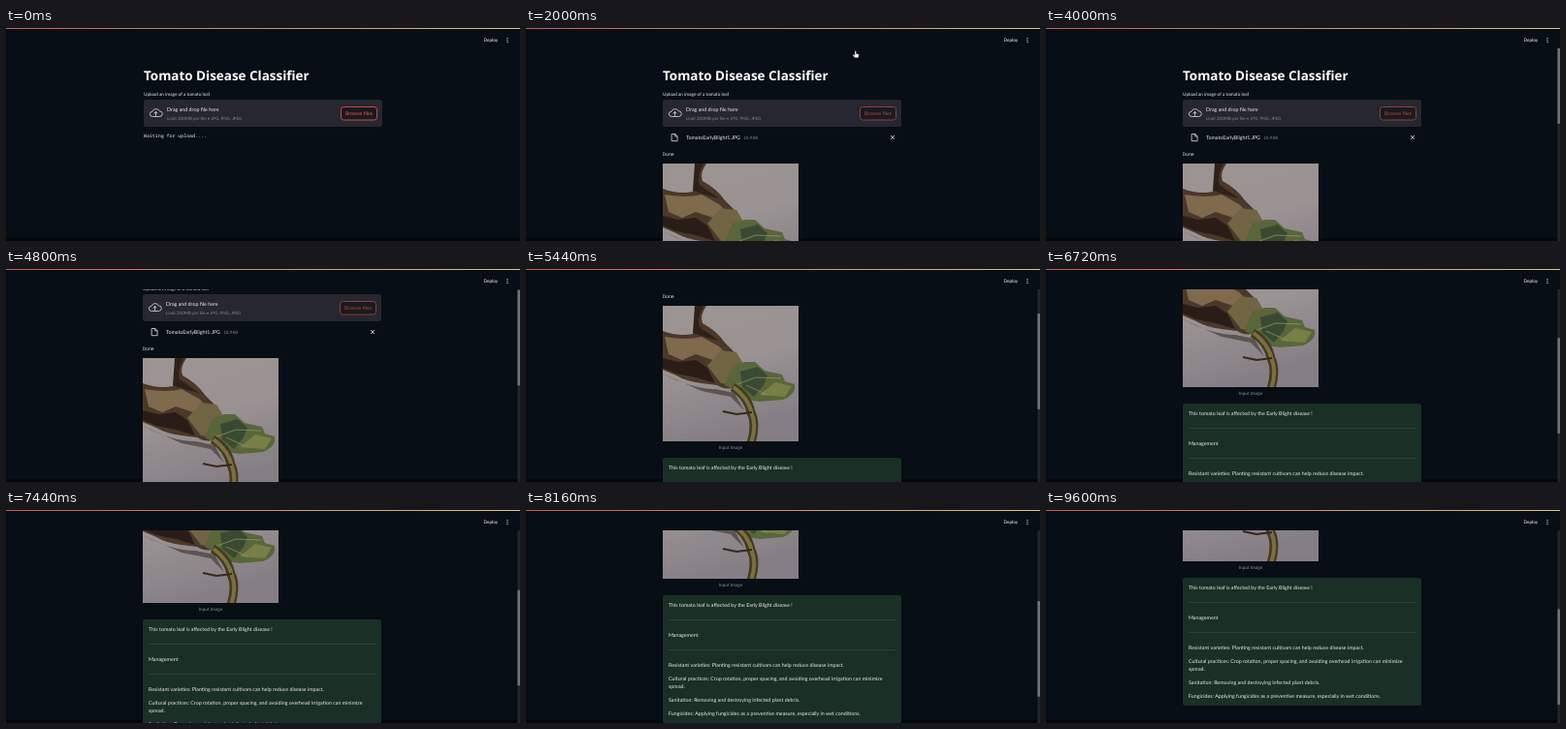
An HTML page that plays this animation: 530 by 220 pixels, repeating every 9920 ms.

```html
<!DOCTYPE html>
<html lang="en">
<head>
<meta charset="utf-8">
<title>Tomato Disease Classifier</title>
<style>
  html, body { margin: 0; width: 100%; height: 100%; overflow: hidden; background: #070e15; }
  svg { display: block; }
  text { font: 5.32px Lato, sans-serif; fill: #eceef0; text-rendering: geometricPrecision; }
  .title { font: bold 13.45px "Noto Sans", sans-serif; fill: #fff; }
  .small { font-size: 4.72px; }
  .muted { font-size: 4.5px; fill: #85878f; }
  .mono { font: 4.92px "Noto Sans Mono", monospace; }
  .line { fill: none; stroke: #c9cbcf; stroke-width: .9; stroke-linecap: round; stroke-linejoin: round; }
  #button text { fill: currentColor; }
</style>
</head>
<body>
<svg width="530" height="220" viewBox="0 0 530 220">
  <defs>
    <linearGradient id="bar">
      <stop offset="0" stop-color="#c95852"/><stop offset="1" stop-color="#dcc48c"/>
    </linearGradient>
    <linearGradient id="wall" x2=".3" y2="1">
      <stop offset="0" stop-color="#9d9592"/><stop offset=".5" stop-color="#9a9293"/><stop offset="1" stop-color="#857f85"/>
    </linearGradient>
    <clipPath id="frame"><path d="M0 0H140V140H0Z"/></clipPath>
  </defs>
  <rect width="530" height="220" fill="#070e15"/>
  <rect y="217" width="530" height="3" fill="#03070b"/>

  <g id="page">
    <text class="title" x="141" y="54.3">Tomato Disease Classifier</text>
    <text class="small" x="141" y="70">Upload an image of a tomato leaf</text>
    <rect x="141" y="74" width="246" height="28" rx="2.8" fill="#262730"/>
    <path class="line" d="M150 91.5a2.6 2.6 0 0 1 0-5.2a4 4 0 0 1 7.4-.4a2.8 2.8 0 0 1 .2 5.6ZM153.5 90.5v-4M152 88l1.5-1.6l1.5 1.6"/>
    <text x="165" y="86">Drag and drop file here</text>
    <text class="muted" x="165" y="95">Limit 200MB per file • JPG, PNG, JPEG</text>
    <g id="button">
      <rect x="344.5" y="81.5" width="37" height="13.5" rx="2.8" fill="#1a1a20" stroke="currentColor" stroke-width=".8"/>
      <text x="363" y="90" text-anchor="middle">Browse files</text>
    </g>
    <text id="waiting" class="mono" x="141" y="113">Waiting for upload....</text>

    <g id="result">
      <path class="line" d="M150.5 109.5h3.4l2.2 2.2v5h-5.6ZM153.7 109.7v2.2h2.2"/>
      <text x="165" y="115">TomatoEarlyBlight1.JPG</text>
      <text class="muted" x="224.5" y="115">18.9KB</text>
      <path class="line" d="M376.3 111.3l3.4 3.4m0-3.4l-3.4 3.4"/>
      <text class="mono" x="141" y="132">Done</text>

      <g transform="translate(141 140)" clip-path="url(#frame)">
        <rect width="140" height="140" fill="url(#wall)"/>
        <path d="M0 70Q30 86 54 86L74 90L84 108L70 94L40 88Z" fill="#5c5453"/>
        <path d="M33 0H45Q38 10 41 18Q56 26 64 38L74 48L80 58L74 84Q66 88 56 82L40 80Q24 78 14 72L0 66V26Q16 32 31 29Q38 14 33 0Z" fill="#4b382a"/>
        <path d="M2 32Q24 36 40 32L58 42L66 50L52 56L34 50L20 56L6 50Z" fill="#806a4e"/>
        <path d="M0 54L16 58L34 56L46 64L54 80L34 74L14 70L0 64Z" fill="#2a1d17"/>
        <path d="M33 0L42 0Q35 14 38 22L58 36L46 33L31 28Z" fill="#2e211a"/>
        <path d="M46 62L60 46L76 48L82 58L74 82L60 80Z" fill="#716443"/>
        <path d="M72 62L84 58L95 58L105 67L123 71L126 78L136 81Q138 91 124 97L100 99L86 97L76 88L64 82Z" fill="#59663a"/>
        <path d="M80 68L98 63L108 72L104 82L94 94L82 84Z" fill="#3a4a32"/>
        <path d="M100 92L116 79L133 83L126 94Z" fill="#777f47"/>
        <path d="M74 82L96 74L122 75M86 82L108 92" fill="none" stroke="#8b9160" stroke-width=".8"/>
        <path d="M72 84Q87 92 91 110Q97 122 91 142" fill="none" stroke="#443c22" stroke-width="9"/>
        <path d="M73 84Q89 96 92 112Q97 124 91 142" fill="none" stroke="#7a7040" stroke-width="4"/>
        <path d="M62 109L76 112L92 110" fill="none" stroke="#38271b" stroke-width="2.2"/>
      </g>
      <text class="small" x="211" y="288" text-anchor="middle" style="fill:#8d9096">Input Image</text>

      <rect x="141" y="297" width="246" height="132" rx="2.8" fill="#1a2f25"/>
      <path d="M147 322.5H381.5M147 353.5H381.5" stroke="#364b3f" stroke-width=".7"/>
      <g id="advice"></g>
    </g>
  </g>

  <g id="scrollbar">
    <rect x="527.5" width="2.5" height="220" fill="#22272d"/>
    <rect id="thumb" x="527.5" width="2.5" height="99" rx="1" fill="#70757a"/>
  </g>
  <rect width="530" height="21" fill="#070e15"/>
  <rect width="530" height="1" fill="url(#bar)"/>
  <text class="small" x="492.5" y="14.3" style="fill:#fff">Deploy</text>
  <path d="M517 10.6v0m0 2v0m0 2v0" stroke="#fff" stroke-width="1.2" stroke-linecap="round"/>
  <path id="cursor" d="M-1-3q.9-.8 1.5 0v2.4l2.2.5q.8.3.6 1.2l-.7 2.7h-3.6l-2.2-2.8q.1-1 1-.6l1.2.7Z" fill="#fff" stroke="#111" stroke-width=".4"/>
</svg>

<script>
const LOOP = 9920, STEP = 80;
const UPLOADED = 880, BAR_SHOWN = 2080;

// Keyframes: [time, value, ...]
const scrollKeys = [[4240, 0], [5440, 102], [6080, 153], [6560, 153], [6720, 158], [8160, 209], [8560, 222], [9120, 226], [9520, 226], [9600, 227]];
const cursorKeys = [[720, 364, 90], [1280, 350, 42], [1600, 340, 27], [2000, 340, 27], [2240, 527, 34], [2640, 532, 37]];

const advice = [
  [308.5, "This tomato leaf is affected by the Early Blight disease !"],
  [339.5, "Management"],
  [370.5, "Resistant varieties: Planting resistant cultivars can help reduce disease impact."],
  [384.5, "Cultural practices: Crop rotation, proper spacing, and avoiding overhead irrigation can minimize"],
  [393, "spread."],
  [407, "Sanitation: Removing and destroying infected plant debris."],
  [421, "Fungicides: Applying fungicides as a preventive measure, especially in wet conditions."]
];

const el = id => document.getElementById(id);
const show = (id, on) => el(id).setAttribute("visibility", on ? "visible" : "hidden");
const move = (id, x, y) => el(id).setAttribute("transform", `translate(${x} ${y})`);

function sample(keys, t) {
  const i = keys.findIndex(key => key[0] > t);
  if (i === 0) return keys[0].slice(1);
  if (i < 0) return keys[keys.length - 1].slice(1);
  const [a, b] = [keys[i - 1], keys[i]];
  const k = (t - a[0]) / (b[0] - a[0]);
  return a.slice(1).map((v, j) => v + (b[j + 1] - v) * k);
}

function draw(t) {
  const uploaded = t >= UPLOADED;
  const [scroll] = sample(scrollKeys, t);
  show("result", uploaded);
  show("waiting", !uploaded);
  el("button").style.color = uploaded ? "#a84a3b" : "#e8584f";
  move("page", uploaded ? 0 : 1, -Math.round(scroll));

  show("scrollbar", t >= BAR_SHOWN);
  move("thumb", 0, scroll * .45);

  show("cursor", t >= 720 && t < 2640);
  move("cursor", ...sample(cursorKeys, t));
}

el("advice").innerHTML = advice.map(([y, s]) => `<text x="147" y="${y}">${s}</text>`).join("");

const start = performance.now();
function tick() {
  const t = (performance.now() - start) % LOOP;
  draw(Math.floor(t / STEP) * STEP);
  requestAnimationFrame(tick);
}
tick();
</script>
</body>
</html>
```
